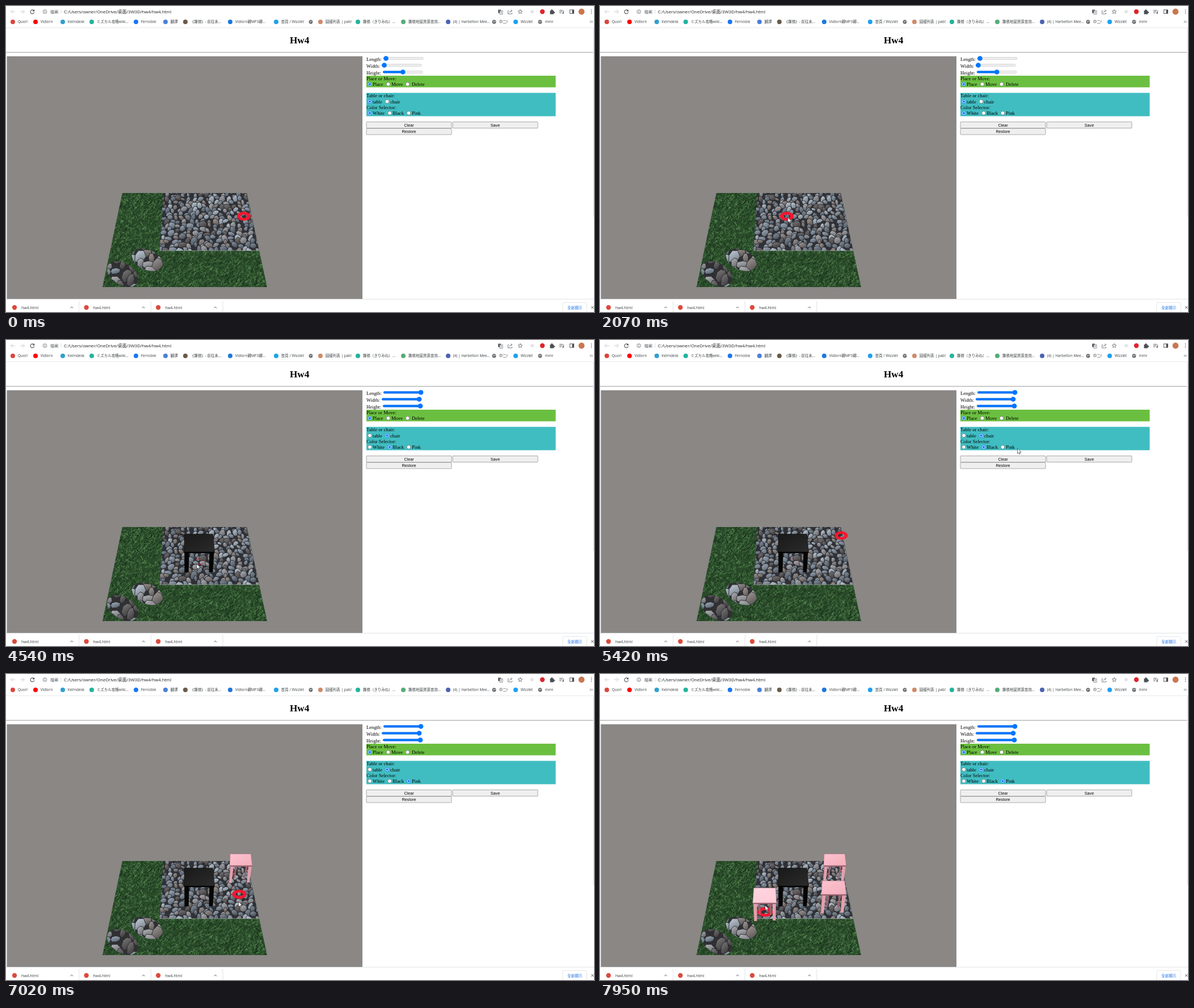
An HTML page for the animation above (8 s loop, 1036x540 px).

```html
<!DOCTYPE html>
<html lang="zh-Hant">
<head>
<meta charset="utf-8">
<title>Hw4</title>
<style>
html, body { margin: 0; width: 100%; height: 100%; overflow: hidden; background: #fff; }
svg { display: block; width: 1036px; height: 540px; }
.ui { font: 6.5px "Open Sans", "Noto Sans CJK TC", "Noto Sans CJK JP", "Noto Sans CJK", sans-serif; fill: #3c4043; }
.page { font: 8.63px "Liberation Serif", serif; fill: #000; }
.button { font: 7.2px "Liberation Sans", sans-serif; fill: #000; text-anchor: middle; }
</style>
</head>
<body>
<svg id="stage" viewBox="0 0 1036 540" xmlns="http://www.w3.org/2000/svg"></svg>
<script>
const stage = document.getElementById("stage");
const LOOP = 8000, STEP = 66.8, BLUE = "#0075ff";

function add(tag, attrs, parent = stage) {
  const node = document.createElementNS(stage.namespaceURI, tag);
  set(node, attrs);
  parent.appendChild(node);
  return node;
}
function set(node, attrs) {
  for (const key in attrs) node.setAttribute(key, attrs[key]);
}
const rect = (x, y, width, height, fill, more, parent) => add("rect", { x, y, width, height, fill, ...more }, parent);
const circle = (cx, cy, r, fill, more, parent) => add("circle", { cx, cy, r, fill, ...more }, parent);
const path = (d, fill, more, parent) => add("path", { d, fill, ...more }, parent);
const line = (d, stroke, width = 1, more) => path(d, "none", { stroke, "stroke-width": width, ...more });
function label(x, y, text, cls, more) {
  add("text", { x, y, class: cls, ...more }).textContent = text;
}
const poly = points => "M" + points.map(p => p.map(v => v.toFixed(1)).join(" ")).join("L") + "Z";

let seed = 7;
function rnd(a = 0, b = 1) {
  seed = (seed * 1664525 + 1013904223) % 4294967296;
  return a + (b - a) * seed / 4294967296;
}
const pick = list => list[Math.floor(rnd(0, list.length))];

// Browser toolbar
function globe(x, y) {
  circle(x, y, 3.4, "#5f6368");
  line(`M${x - 2} ${y - 1.5}l2 1.2l-1 1.8M${x + 1} ${y - 2}l1.2 2.2`, "#fff", 0.9);
}

function drawToolbar() {
  line("M16 10H8.5M12 6.5L8.5 10L12 13.5M25 10h7.5M29 6.5l3.5 3.5l-3.5 3.5", "#c4c7ca", 0.9);
  line("M49 8A3.4 3.4 0 1 0 49.8 11", "#4b4f53", 1.1);
  path("M50.2 6v3.6h-3.6z", "#4b4f53");
  circle(68.5, 10, 3.3, "none", { stroke: "#5f6368", "stroke-width": 0.8 });
  line("M68.5 9.5v2.4M68.5 7.9v.9", "#5f6368", 0.9);
  label(78, 12.8, "檔案", "ui", { style: "font-size:7.2px;fill:#5f6368" });
  line("M97 6v8", "#c8cacd", 0.6);
  label(102, 12.8, "C:/Users/owner/OneDrive/桌面/3W3D/hw4/hw4.html", "ui", { style: "font-size:7.7px;fill:#202124" });

  const grey = "#5f6368";
  rect(867, 6.5, 5, 6, grey);
  rect(870, 8.5, 5, 6, "#fff", { stroke: grey, "stroke-width": 0.7 });
  line("M871.2 10.5h2.6M872.5 10.5v2.5", grey, 0.6);
  line("M886 8.5h-1.5v5.5h7v-2M887 12q.5-3.5 4.5-3.7M889.6 6.2l2.2 2.1l-2.2 2.1", grey, 0.8);
  const star = Array.from({ length: 10 }, (_, i) => {
    const a = i * Math.PI / 5 - Math.PI / 2, r = i % 2 ? 1.7 : 4;
    return [906 + r * Math.cos(a), 10.2 + r * Math.sin(a)];
  });
  path(poly(star), "none", { stroke: grey, "stroke-width": 0.8 });
  circle(927, 10, 3, "#e4e5e7");
  circle(945, 10, 4.2, "#e0242b");
  path("M958.5 8h2a1.4 1.4 0 1 1 2.6 0h2v2.2a1.4 1.4 0 1 1 0 2.4v2h-6.6z", "#4b4f53");
  line("M975 7.5h6M975 9.8h6M975 12h3.5M982.5 8v4.5", grey, 0.9);
  circle(981.5, 12.5, 1.3, grey);
  rect(993.5, 6.8, 7, 6.4, "none", { stroke: "#4b4f53", "stroke-width": 0.9 });
  rect(997.5, 7, 3, 6, "#4b4f53");
  circle(1014, 10, 5.4, "#c9784f");
  for (const y of [7, 10, 13]) circle(1031.5, y, 0.8, "#4b4f53");
}

function drawBookmarks() {
  const items = [
    [12, "#d9473c", "Quorl"], [52, "#f00", "Vidlorn"], [100, "#2f9fd0", "Kelmdesk"],
    [151, "#25b39e", "ミズカル攻略wiki..."], [229, "#1877f2", "Fernoble"], [281, "#4a80d8", "翻譯"],
    [316, "#6a5a48", "《霧嶺》- 前往未..."], [395, "#1e78e0", "Vidlorn轉MP3轉..."],
    [476, "#1da1f2", "首頁 / Wizzlet"], [537, "", ""], [554, "#d08a68", "圖譜列表 | pab!"],
    [620, "#25b39e", "霧嶺（きりみね）..."], [700, "#55ad78", "霧嶺地圖資源查詢..."],
    [779, "#4b63b4", "(4) | Harbelton Mee..."], [860, "", "中二r"], [898, "#1da1f2", "Wizzlet"], [941, "", "mmr"]
  ];
  for (const [x, color, text] of items) {
    if (color) circle(x, 28, 4, color); else globe(x, 28);
    label(x + 8.7, 30.4, text, "ui");
  }
  line("M1029 26l1.8 1.8l-1.8 1.8M1031.7 26l1.8 1.8l-1.8 1.8", "#4b4f53", 0.8);
  line("M0 38.2H1036", "#e3e4e6", 0.8);
}

function drawDownloads() {
  rect(0, 517, 1036, 23, "#fff");
  line("M0 517.3H1036", "#d5d7da", 0.7);
  for (const x of [0, 126.6, 253.2]) {
    circle(15 + x, 532, 4.2, "#dc4a3c");
    label(27 + x, 534.6, "hw4.html", "ui", { style: "font-size:6.9px" });
    line(`M${113.3 + x} 533.2l2.4-2.4l2.4 2.4`, "#4b4f53", 0.9);
    line(`M${128.8 + x} 520v20`, "#d5d7da", 0.7);
  }
  rect(980.8, 523.3, 42.5, 19, "#fff", { rx: 2, stroke: "#d9dbdf", "stroke-width": 0.7 });
  label(989, 534.6, "全部顯示", "ui", { style: "font-size:6.6px;fill:#1a73e8" });
  line("M1031 529.8l4.5 4.5M1035.5 529.8l-4.5 4.5", "#4b4f53", 0.9);
}

// Garden floor, seen in perspective
const nearness = y => (219 + 71 * (y - 330) / 166) / 236.5;

function clip(id, tag, attrs) {
  add(tag, attrs, add("clipPath", { id }, defs));
  return add("g", { "clip-path": `url(#${id})` });
}

function grass(group) {
  const colors = ["#142916", "#1d3a1e", "#325c31", "#477a44", "#69985f"];
  const blades = colors.map(() => "");
  for (let i = 0; i < 5200; i++) {
    const y = rnd(326, 498), s = nearness(y), x = 315 + rnd(-125, 125) * s;
    const a = rnd() < 0.7 ? rnd(1.7, 2.7) : rnd(0.4, 1.5), len = rnd(3, 7) * s;
    const k = Math.floor(rnd(0, 5));
    blades[k] += `M${x.toFixed(1)} ${y.toFixed(1)}l${(len * Math.cos(a)).toFixed(1)} ${(len * Math.sin(a) * 0.8).toFixed(1)}`;
  }
  blades.forEach((d, k) => path(d, "none", { stroke: colors[k], "stroke-width": k > 3 ? 0.7 : 1 }, group));
}

const tones = [
  ["#c3ced8", "#78838f"], ["#a5b2bf", "#5c6672"], ["#8c98a5", "#4b535d"],
  ["#a49e9c", "#5d5756"], ["#807c7d", "#403e41"], ["#b5b6b9", "#696a70"]
];
function stones(group, [x0, y0, x1, y1], size, shades) {
  for (let y = y0; y < y1; y += size * 0.62 * nearness(y)) {
    const s = size * nearness(y);
    for (let x = x0 + rnd(-s, 0); x < x1; x += s * 0.95) {
      const r = s * rnd(0.42, 0.72), flat = rnd(0.55, 0.85), turn = rnd(0, Math.PI);
      const cx = x + rnd(-s, s) * 0.25, cy = y + rnd(-s, s) * 0.2;
      const pts = Array.from({ length: 7 }, (_, i) => {
        const a = i * Math.PI * 2 / 7, q = r * rnd(0.8, 1.1);
        const u = q * Math.cos(a), v = q * flat * Math.sin(a);
        return [cx + u * Math.cos(turn) - v * Math.sin(turn), cy + u * Math.sin(turn) + v * Math.cos(turn)];
      });
      path(poly(pts), `url(#tone${pick(shades)})`, { stroke: "#26272b", "stroke-width": 0.9, "stroke-linejoin": "round" }, group);
    }
  }
}

const defs = add("defs", {});
function gradient(id, from, to, x2 = 0.5) {
  const g = add("linearGradient", { id, x1: 0, y1: 0, x2, y2: 1 }, defs);
  add("stop", { offset: 0, "stop-color": from }, g);
  add("stop", { offset: 1, "stop-color": to }, g);
}
tones.forEach(([a, b], i) => gradient("tone" + i, a, b));

function drawGarden() {
  rect(1.5, 88.7, 626.5, 428.3, "#8a8785");
  const lawn = clip("lawn", "path", { d: "M205 330H424L460 496H170Z" });
  rect(165, 325, 300, 175, "#294a29", {}, lawn);
  grass(lawn);
  const bed = clip("bed", "path", { d: "M277 330H424L446 432H270.5Z" });
  rect(265, 325, 185, 110, "#303136", {}, bed);
  stones(bed, [268, 328, 450, 437], 11, [0, 1, 1, 2, 2, 3, 4, 5]);
  line("M270.5 431.7H446", "#b0b5b8", 0.6);
  const slabs = [[249, 448, 28.5, 17.5, 24, [0, 1, 3, 5, 5]], [205.5, 473, 30, 19, 32, [1, 3, 4, 4, 5]]];
  slabs.forEach(([cx, cy, rx, ry, turn, shades], i) => {
    const at = { cx, cy, rx, ry, transform: `rotate(${turn} ${cx} ${cy})` };
    const slab = clip("slab" + i, "ellipse", at);
    rect(cx - 32, cy - 28, 64, 56, "#303033", {}, slab);
    stones(slab, [cx - 34, cy - 26, cx + 34, cy + 28], 17, shades);
  });
}

// Control panel
const radios = {};
function radio(name, x, y, text, tx) {
  const ring = circle(x, y, 3.3, "#fff", { "stroke-width": 0.8 });
  const dot = circle(x, y, 2, BLUE);
  label(tx, y + 3.4, text, "page");
  radios[name] = on => {
    set(ring, { stroke: on ? BLUE : "#767676" });
    set(dot, { opacity: on ? 1 : 0 });
  };
}
function slider(text, x, y) {
  label(635, y + 4.3, text, "page");
  rect(x, y - 1.9, 70, 3.8, "#efefef", { rx: 1.9, stroke: "#b2b2b2", "stroke-width": 0.5 });
  const fill = rect(x, y - 2.1, 4, 4.2, BLUE, { rx: 2.1 });
  const thumb = circle(x, y, 4.3, BLUE);
  return v => {
    const at = 4.5 + 61.5 * v;
    set(fill, { width: at });
    set(thumb, { cx: x + at });
  };
}
function button(x, y, text) {
  const box = rect(x, y, 150, 11, "#efefef", { rx: 1, stroke: "#767676", "stroke-width": 0.6 });
  label(x + 75, y + 8.1, text, "button");
  return box;
}

drawToolbar();
drawBookmarks();
label(517.2, 65.5, "Hw4", "page", { style: "font-size:17.27px;font-weight:bold;text-anchor:middle" });
line("M0 81.8H1034.5", "#9a9a9a", 1);
line("M1035.4 39V372", "#d6d6d6", 0.8);
drawGarden();

const sliders = [slider("Length:", 665, 92.5), slider("Width:", 662, 104.5), slider("Height:", 664, 116.5)];
rect(635, 123, 333.5, 20.5, "#6bbf40");
label(635, 131, "Place or Move:", "page");
radio("place", 641, 138, "Place", 646);
radio("move", 673.5, 138, "Move", 679);
radio("delete", 707.5, 138, "Delete", 715);
rect(635, 153.3, 333.5, 41.2, "#40bdc1");
label(635, 161.3, "Table or chair:", "page");
radio("table", 641, 168.5, "table", 646);
radio("chair", 671.5, 168.5, "chair", 677);
label(635, 182, "Color Selector:", "page");
radio("white", 641, 189, "White", 646);
radio("black", 676, 189, "Black", 681);
radio("pink", 709.5, 189, "Pink", 715);
const clearButton = button(635, 204.5, "Clear");
button(787, 204.5, "Save");
button(635, 216, "Restore");
drawDownloads();

// Moving parts
gradient("ebony", "#191919", "#2b2b2b", 1);
gradient("rose", "#ffc3cf", "#f2afbc", 1);
gradient("blush", "#ffd6e0", "#ffcad6", 1);

const ringShape = path("M-12 0a12 7.8 0 1 0 24 0a12 7.8 0 1 0-24 0M-6 0a6 3.1 0 1 0 12 0a6 3.1 0 1 0-12 0", "#f8152f", { "fill-rule": "evenodd" });
const ringTrace = line("M333 389q4-4 9-2M338 396q5 1 9-2M347 387l4 3", "#d3202f", 1);

function chair(back, front, foot, top, leg, side, inner) {
  const g = add("g", {});
  const [bx0, bx1, by] = back, [fx0, fx1, fy] = front;
  const w = fx1 - fx0, lw = w * 0.15, edge = fy + 2;
  const low = x => x + (315 - x) * 0.03;
  const post = (x, width, bottom, fill) =>
    path(poly([[x, edge], [x + width, edge], [low(x + width) - 0.6, bottom], [low(x) + 0.6, bottom]]), fill, {}, g);
  if (inner) {
    const rear = foot - (fy - by) * 0.4;
    post(fx0 + w * 0.23, lw * 0.6, rear, side);
    post(fx0 + w * 0.7, lw * 0.6, rear, side);
  }
  post(fx0 + 0.8, lw, foot, leg);
  post(fx1 - lw - 1, lw, foot - (inner ? 1 : 0), leg);
  path(poly([[fx0 + 0.8, edge], [fx0 + 1.6, edge], [low(fx0) + 1.4, foot], [low(fx0) + 0.6, foot]]), side, {}, g);
  path(poly([[fx0, fy], [fx1, fy], [fx1 - 0.3, edge], [fx0 + 0.3, edge]]), side, {}, g);
  path(poly([[bx0, by], [bx1, by], [fx1, fy], [fx0, fy]]), `url(#${top})`, { stroke: side, "stroke-width": 0.5 }, g);
  return g;
}
const pinkChair = (back, front, foot, top = "rose") => chair(back, front, foot, top, "#e2a0ac", "#9b636e", true);
const chairs = [
  [6500, pinkChair([395, 431.5, 317.5], [394, 434, 338], 369)],
  [4270, chair([314.5, 364.5, 342.5], [313.8, 367.5, 374], 410, "ebony", "#060606", "#020202", false)],
  [7130, pinkChair([391.5, 431, 365], [390, 434, 389], 422)],
  [7800, pinkChair([271, 309.5, 377.5], [269, 311, 404], 436, "blush")]
];
const cursor = path("M0 0V9.3L2.1 7.4L3.6 10.6L5 10L3.6 6.9H6.5Z", "#fff", { stroke: "#111", "stroke-width": 0.6 });

// Each key is time, x, y. The ring rests while the pointer is away from the floor.
const floorKeys = [
  [0, 419, 371], [1590, 419, 371], [1600, 425, 356], [1800, 330, 371], [2140, 329, 371], [2300, 344, 361],
  [2400, 338, 384], [2550, 348, 371], [2680, 352, 366], [2870, 415, 340], [4120, 415, 340], [4130, 424, 350],
  [4340, 341, 388], [4540, 343, 392], [4609, 334, 393], [4800, 400, 360], [4870, 425, 345],
  [6330, 425, 345], [6345, 410, 331], [6420, 410, 332], [6890, 412, 363], [7020, 411, 390],
  [7090, 407, 401], [7420, 350, 436], [7690, 297, 421], [7950, 291, 420], [8010, 289, 406]
];

// Visits to the control panel
function panelTrip(t) {
  if (t < 1600) return along([
    [130, 562, 403], [600, 715, 97], [930, 818, 186], [1200, 930, 147], [1400, 780, 205], [1600, 427, 358]
  ], t);
  if (t > 2880 && t < 4130) return along([
    [2870, 417, 342], [3130, 698, 183], [3350, 679, 188], [3600, 674, 188], [3680, 671, 168],
    [3780, 670, 94], [3810, 728, 94], [3950, 727, 117], [4130, 426, 352]
  ], t);
  if (t > 4870 && t < 6345) return along([
    [4870, 427, 347], [5070, 700, 190], [5200, 767, 154], [5350, 738, 186], [5600, 728, 207],
    [5950, 707, 187], [6150, 706, 186], [6345, 412, 334]
  ], t);
  return null;
}

function along(keys, t) {
  const i = keys.findIndex(k => k[0] > t);
  if (i < 0) return keys[keys.length - 1].slice(1);
  if (i === 0) return keys[0].slice(1);
  const [a, b] = [keys[i - 1], keys[i]], q = (t - a[0]) / (b[0] - a[0]);
  return [a[1] + (b[1] - a[1]) * q, a[2] + (b[2] - a[2]) * q];
}
const pointer = t => panelTrip(t) || along(floorKeys, t + STEP).map(v => v + 2);

function render(now) {
  const t = Math.floor((now % LOOP + 5) / STEP) * STEP;
  const [cx, cy] = pointer(t);
  set(cursor, { transform: `translate(${cx} ${cy})`, opacity: t < 130 ? 0 : 1 });

  const [rx, ry] = along(floorKeys, t);
  const covered = t >= 4270 && t < 4670;
  set(ringShape, { transform: `translate(${rx} ${ry}) scale(${nearness(ry)})`, opacity: covered ? 0 : 1 });
  set(ringTrace, { opacity: covered ? 1 : t >= 4670 ? 0.35 : 0 });
  for (const [start, node] of chairs) set(node, { display: t >= start ? "inline" : "none" });

  const color = t < 3540 ? "white" : t < 5950 ? "black" : "pink";
  const kind = t < 3670 ? "table" : "chair";
  for (const name in radios) radios[name](["place", kind, color].includes(name));
  sliders[0](t < 3800 ? 0 : 1);
  sliders[1](t < 3870 ? 0 : 1);
  sliders[2](t < 3940 ? 0.5 : 1);
  const hover = cx > 635 && cx < 785 && cy > 204.5 && cy < 215.5;
  set(clearButton, { fill: hover ? "#e0e0e0" : "#efefef" });
}

const begin = performance.now();
function tick() {
  render(performance.now() - begin);
  requestAnimationFrame(tick);
}
tick();
</script>
</body>
</html>
```
